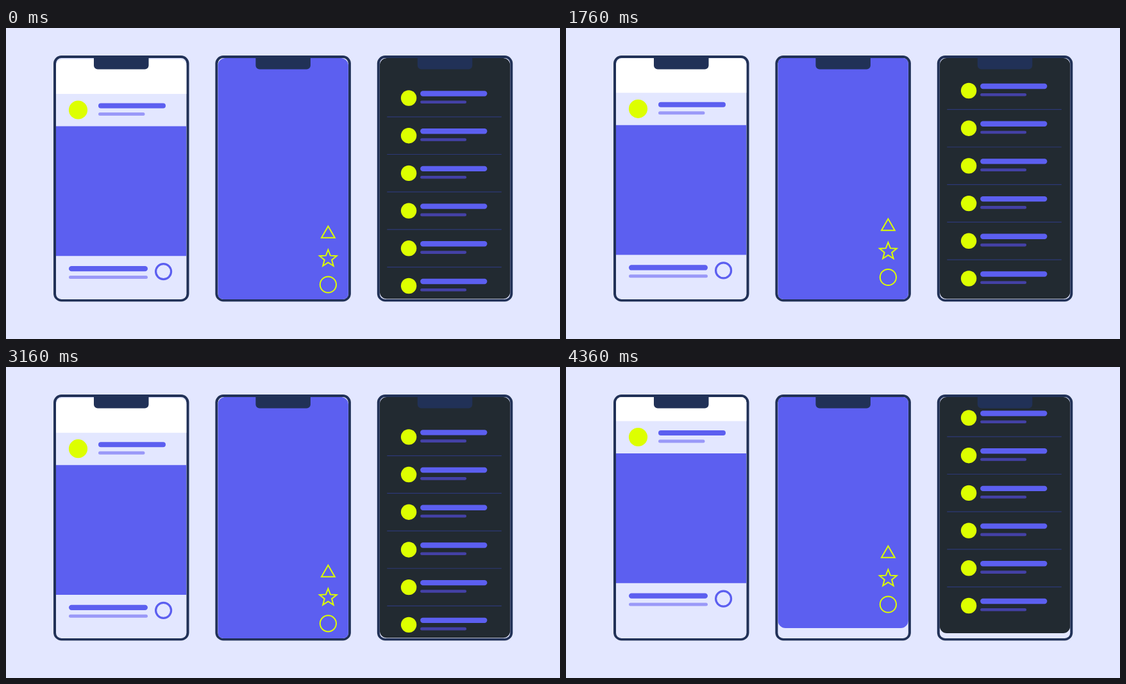
Write an HTML page with a canvas that moves like this. It is 864 px wide and 486 px high and loops after 4.4 s.

```html
<!DOCTYPE html>
<html lang="en">
<head>
<meta charset="utf-8">
<title>Swiping phones</title>
<style>
  html, body { margin: 0; width: 100%; height: 100%; overflow: hidden; background: #e3e7ff; }
  canvas { display: block; }
</style>
</head>
<body>
<canvas id="stage" width="864" height="486"></canvas>
<script>
const ctx = document.getElementById('stage').getContext('2d');
const PALE = '#e3e7ff', NAVY = '#213157', BLUE = '#5c5ff0', SOFT = '#9a99f8',
      LIME = '#ddff00', DARK = '#222a31', DIM = '#4441a6', RULE = '#2c3877';

const LOOP = 4400, START = 440, STEP = 40, STEPS = 14, CARDS = 8;
const TOP = 47;

function box(x, y, w, h, r, color) {
  ctx.fillStyle = color;
  ctx.beginPath();
  ctx.roundRect(x, y, w, h, r);
  ctx.fill();
}

const bar = (x, y, w, h, color) => box(x, y, w, h, h / 2, color);

function disc(x, y, r, color) {
  ctx.fillStyle = color;
  ctx.beginPath();
  ctx.arc(x, y, r, 0, Math.PI * 2);
  ctx.fill();
}

function ring(x, y, r, width, color) {
  ctx.strokeStyle = color;
  ctx.lineWidth = width;
  ctx.beginPath();
  ctx.arc(x, y, r, 0, Math.PI * 2);
  ctx.stroke();
}

// Closed outline through points at alternating radii, first point up.
function spikes(x, y, count, radii) {
  ctx.strokeStyle = LIME;
  ctx.lineWidth = 2;
  ctx.beginPath();
  for (let i = 0; i < count; i++) {
    const a = i / count * Math.PI * 2 - Math.PI / 2, r = radii[i % radii.length];
    ctx.lineTo(x + r * Math.cos(a), y + r * Math.sin(a));
  }
  ctx.closePath();
  ctx.stroke();
}

function postCard(y) {
  box(4, y, 203.5, 54, [10, 10, 0, 0], '#fff');
  disc(38.5, y + 79, 14.6, LIME);
  bar(70, y + 68.5, 105, 8, BLUE);
  bar(70, y + 83, 72.5, 5, SOFT);
  box(4, y + 104.5, 203.5, 202.7, 0, BLUE);
  bar(24, y + 323, 123, 8.3, BLUE);
  bar(24, y + 338, 123, 5, SOFT);
  ring(171.6, y + 331.6, 12, 3.2, BLUE);
}

function videoCard(y) {
  box(4, y, 203.5, 391, 12, BLUE);
  spikes(176, y + 274.8, 3, [12]);
  spikes(176, y + 313.5, 10, [14, 6]);
  ring(176, y + 354, 12.6, 2, LIME);
}

function listCard(y) {
  for (let i = 0; i < 6; i++) {
    const row = y + 62.5 + i * 58.7;
    disc(49.3, row, 12.2, LIME);
    bar(67.3, row - 11.2, 104.3, 8.4, BLUE);
    bar(67.3, row + 4, 72, 4.6, DIM);
    if (i < 5) box(15.5, row + 28.7, 178.5, 1.2, 0, RULE);
  }
}

// Displacement during the fast part of a swipe; the rest settles onto the pitch.
const longSwipe = [30, 342, 448, 499, 523.5, 523.5, 518, 513];
const phones = [
  { card: postCard, top: 49, pitch: 482, swipe: [18.5, 312, 418, 465, 483.7, 483.7, 483.7, 483.7] },
  { card: videoCard, top: TOP, pitch: 512, swipe: longSwipe },
  { card: listCard, top: TOP, pitch: 512, swipe: longSwipe, strip: 399 }
];

function scrollAt(t, { pitch, swipe }) {
  if (t < START) return 0;
  const n = Math.floor((t - START) / STEP), step = n % STEPS, last = swipe.length - 1;
  const settle = Math.max(0, step - last) / (STEPS - 1 - last);
  const from = swipe[Math.min(step, last)];
  return Math.floor(n / STEPS) * pitch + from + (pitch - from) * settle;
}

function drawPhone(phone, t) {
  const y0 = phone.top - scrollAt(t, phone);
  box(0, 43, 211.5, 384.5, 12.5, NAVY);
  box(4, TOP, 203.5, 377, 8.5, PALE);

  ctx.save();
  ctx.beginPath();
  ctx.roundRect(4, TOP, 203.5, phone.strip ? 376.2 : 377, phone.strip ? 11 : 8.5);
  ctx.clip();
  if (phone.strip) box(4, y0, 203.5, (CARDS - 1) * phone.pitch + phone.strip, 11, DARK);
  for (let i = 0; i < CARDS; i++) {
    const y = y0 + i * phone.pitch;
    if (y > -400 && y < 430) phone.card(y);
  }
  ctx.restore();

  box(63, 44, 85.5, 20.6, [0, 0, 6, 6], NAVY);
}

function draw(now) {
  const t = now % LOOP;
  ctx.fillStyle = PALE;
  ctx.fillRect(0, 0, 864, 486);
  phones.forEach((phone, i) => {
    ctx.save();
    ctx.translate(74 + i * 252.4, 0);
    drawPhone(phone, t);
    ctx.restore();
  });
}

let origin;
function tick(now) {
  origin ??= now;
  draw(now - origin);
  requestAnimationFrame(tick);
}
requestAnimationFrame(tick);
</script>
</body>
</html>
```
